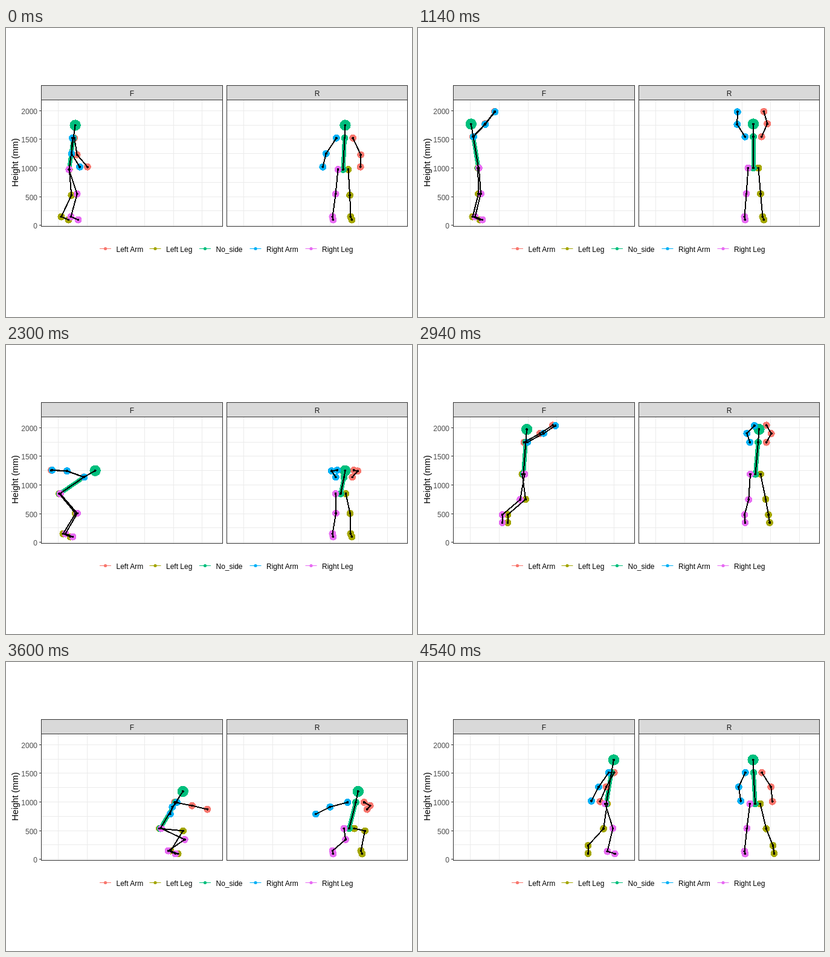
An HTML page for the animation above (4560 ms loop, 672 by 480 pixels).

```html
<!DOCTYPE html>
<html lang="en">
<head>
<meta charset="utf-8">
<title>Jump skeleton</title>
<style>
  html, body { margin: 0; width: 100%; height: 100%; overflow: hidden; background: #fff; }
  svg { display: block; width: 672px; height: 480px; font-family: "Liberation Sans", Arial, sans-serif; font-size: 12px; }
</style>
</head>
<body>
<svg id="stage" viewBox="0 0 672 480"></svg>
<script>
const LOOP = 4560, STEP = 20;
const COLORS = { leftArm: "#F8766D", leftLeg: "#A3A500", mid: "#00BF7D", rightArm: "#00B0F6", rightLeg: "#E76BF3" };
const stage = document.getElementById("stage");

function add(tag, attrs, text, parent = stage) {
  const node = document.createElementNS("http://www.w3.org/2000/svg", tag);
  for (const k in attrs) node.setAttribute(k, attrs[k]);
  if (text) node.textContent = text;
  return parent.appendChild(node);
}
const line = (x1, y1, x2, y2, stroke) => add("line", { x1, y1, x2, y2, stroke });
const pixel = v => Math.round(v) + 0.5;
const heightY = mm => pixel(327.1 - mm * 0.09508);

// ---- chart ----
function drawPanel(x, w, firstGrid, name) {
  for (let mm = 0; mm <= 2000; mm += 250) line(x, heightY(mm), x + w, heightY(mm), "#EBEBEB");
  for (let i = 0; i < 6; i++) {
    const gx = pixel(firstGrid + i * 47.6);
    line(gx, 120, gx, 329, "#EBEBEB");
  }
  add("rect", { x, y: 119.5, width: w, height: 210, fill: "none", stroke: "#333333" });
  add("rect", { x, y: 95.5, width: w, height: 24, fill: "#D9D9D9", stroke: "#333333" });
  add("text", { x: x + w / 2, y: 113, "text-anchor": "middle", fill: "#1A1A1A" }, name);
}
drawPanel(58.5, 300, 86.3, "F");
drawPanel(365.5, 299, 393, "R");
for (let mm = 0; mm <= 2000; mm += 500) {
  const y = heightY(mm);
  line(55, y, 58, y, "#333333");
  add("text", { x: 52, y: y + 5, "text-anchor": "end", fill: "#4D4D4D" }, String(mm));
}
add("text", { transform: "translate(20 223.5) rotate(-90)", "text-anchor": "middle", "font-size": 14.67 }, "Height (mm)");
[["Left Arm", 165, "leftArm"], ["Left Leg", 247.5, "leftLeg"], ["No_side", 330, "mid"],
 ["Right Arm", 413.5, "rightArm"], ["Right Leg", 505.5, "rightLeg"]].forEach(([label, x, part]) => {
  line(x - 10, 366.5, x + 9, 366.5, COLORS[part]);
  add("circle", { cx: x - 0.5, cy: 366.5, r: 2.6, fill: COLORS[part] });
  add("text", { x: x + 17.5, y: 372 }, label);
});

// ---- motion: each track is time, value, time, value ... ----
const tracks = {
  hipX: [0, 104, 1140, 99.5, 1740, 103.5, 2300, 88.5, 2720, 136, 2940, 174, 3240, 222, 3600, 255, 4540, 311],
  hipY: [0, 234.5, 1140, 232, 1740, 232.5, 2300, 246.5, 2720, 240, 2940, 214, 3240, 253, 3600, 276, 4250, 237, 4540, 235],
  lean: [0, 7.7, 1140, -9.3, 1740, -6.8, 2300, 55.5, 2720, 36, 2940, 4.2, 3240, 24, 3600, 30.5, 4250, 10, 4540, 9.5],
  sideHip: [0, 557.5, 1140, 554.5, 2300, 553.5, 2940, 558, 3600, 567.5, 4540, 557.5],
  sideLean: [0, 2.5, 1140, 0, 2300, 5.5, 2940, 4.5, 3600, 11, 4540, -2.5],
  swing: [0, 3, 560, 12, 1140, 137, 1740, 137, 2300, -110, 2620, 5, 2940, 119, 3240, 145, 3600, 17, 4540, -32],
  flex: [0, 33, 1140, 5, 2300, 17, 2940, 4, 3600, 13, 4540, 7],
  twist: [0, 6, 1140, 0, 3240, 0, 3600, 62, 4250, 5, 4540, 3],
  outLeft: [0, 13, 500, 15.5, 1140, 9.5, 2300, 9, 2600, 17, 2940, 8, 3350, 20, 3600, 10, 3900, 17, 4540, 15],
  outRight: [0, 17, 1140, 13, 2300, 7, 2940, 5, 3600, 29, 4540, 11],
  footX: [0, 99, 1140, 92, 1740, 92.3, 2300, 96, 2720, 104, 2940, 143.5, 3240, 266, 3600, 270, 4000, 274, 4540, 297],
  footY: [0, 313, 2500, 313, 2720, 304, 2940, 281.5, 3300, 312.5, 4540, 314],
  stride: [0, -16, 1140, -4, 2300, -4, 2940, 9, 3600, 4, 4000, 0, 4540, -32]
};

// Monotone cubic through a track's points.
function follow(p, t) {
  const last = p.length / 2 - 1;
  const rate = i => (p[2 * i + 3] - p[2 * i + 1]) / (p[2 * i + 2] - p[2 * i]);
  const slope = i => {
    if (i === 0 || i === last) return rate(i && i - 1);
    const a = rate(i - 1), b = rate(i);
    return a * b <= 0 ? 0 : 2 * a * b / (a + b);
  };
  let i = 0;
  while (i < last - 1 && p[2 * i + 2] <= t) i++;
  const h = p[2 * i + 2] - p[2 * i], u = Math.min(1, (t - p[2 * i]) / h), v = 1 - u;
  return p[2 * i + 1] * (1 + 2 * u) * v * v + p[2 * i + 3] * u * u * (3 - 2 * u) +
    h * u * v * (slope(i) * v - slope(i + 1) * u);
}

// ---- body: points are { f: forward, s: sideways, y } ----
const UPPER = 31, FOREARM = 26.5, THIGH = 43, SHANK = 39.5, FOOT = 13, FLOOR = 318;
const rad = deg => deg * Math.PI / 180;
const inPlane = (length, side) => Math.sqrt(Math.max(0, length * length - side * side));

// Bone turned by pitch from hanging straight down, reaching side px sideways.
function bone(from, length, pitch, side) {
  const l = inPlane(length, side), a = rad(pitch);
  return { f: from.f + l * Math.sin(a), s: from.s + side, y: from.y + l * Math.cos(a) };
}

function arm(neck, m, side) {
  const out = side > 0 ? m.outLeft : m.outRight;
  const pitch = m.swing + side * m.twist;
  const shoulder = { f: neck.f - side * (0.18 * m.stride + 1.2), s: neck.s + side * 13.7, y: neck.y };
  const elbow = bone(shoulder, UPPER, pitch, side * out);
  const wrist = bone(elbow, FOREARM, pitch + m.flex - side * m.twist / 4, side * (1.5 * out - 20));
  return [shoulder, elbow, wrist];
}

function leg(pelvis, m, side, t) {
  const hip = { f: pelvis.f - side * (0.09 * m.stride + 1.2), s: pelvis.s + side * 8.5, y: pelvis.y };
  const shift = Math.min(1, Math.max(0, (t - 2400) / 1000));
  const rear = side * m.stride < 0;
  const heel = rear ? Math.max(0, Math.abs(m.stride) - 16) * 0.6 : 0;
  const ankle = {
    f: m.footX + side * m.stride / 2,
    s: side > 0 ? 570 + 17 * shift * shift * (3 - 2 * shift) : 540,
    y: m.footY - heel
  };
  // The knee bends forward between hip and ankle.
  const s = (hip.s + ankle.s) / 2 + m.sideLean * Math.abs(m.sideLean) / 10;
  const a = inPlane(THIGH, s - hip.s), b = inPlane(SHANK, s - ankle.s);
  const df = ankle.f - hip.f, dy = ankle.y - hip.y, d = Math.hypot(df, dy);
  const along = (a * a - b * b + d * d) / (2 * d), bend = inPlane(a, along);
  const knee = { f: hip.f + (df * along + dy * bend) / d, s, y: hip.y + (dy * along - df * bend) / d };
  const drop = Math.min(FOOT, FLOOR - ankle.y);
  const toe = { f: ankle.f + inPlane(FOOT, drop), s: ankle.s + (side > 0 ? 2 : 1), y: ankle.y + drop };
  return [hip, knee, ankle, toe];
}

function pose(t) {
  const m = {};
  for (const name in tracks) m[name] = follow(tracks[name], t);
  const pelvis = { f: m.hipX, s: m.sideHip, y: m.hipY };
  const spine = 53.5 - 6 * Math.abs(Math.sin(rad(m.lean)));
  const rise = (from, length, angle, side) =>
    ({ f: from.f + length * Math.sin(rad(angle)), s: from.s + side, y: from.y - length * Math.cos(rad(angle)) });
  const neck = rise(pelvis, spine, m.lean, m.sideLean);
  const head = rise(neck, 21.5, m.lean * 1.08, m.sideLean * 0.35);
  return {
    leftArm: arm(neck, m, 1), leftLeg: leg(pelvis, m, 1, t), mid: [head, neck, pelvis],
    rightArm: arm(neck, m, -1), rightLeg: leg(pelvis, m, -1, t)
  };
}

// ---- drawing ----
const SIZES = { leftArm: 3, leftLeg: 4, mid: 3, rightArm: 3, rightLeg: 4 };
function makeBody(axis) {
  const group = add("g", { transform: "translate(0.5 0.5)", "shape-rendering": "crispEdges" });
  const dots = [], bones = [];
  const dot = (part, i, r, fill) => dots.push([add("circle", { r, fill }, "", group), part, i]);
  const path = (part, from, stroke, width) =>
    bones.push([add("polyline", { fill: "none", stroke, "stroke-width": width, "stroke-linejoin": "round" }, "", group), part, from]);
  const eachDot = fn => {
    for (const part in SIZES) for (let i = 0; i < SIZES[part]; i++) fn(part, i);
  };
  path("mid", 1, COLORS.mid, 7);
  eachDot((part, i) => dot(part, i, part === "mid" && i === 0 ? 9.2 : 6, COLORS[part]));
  for (const part in SIZES) path(part, 0, "#000", 2);
  eachDot((part, i) => dot(part, i, 2, "#000"));

  return body => {
    for (const [node, part, i] of dots) {
      node.setAttribute("cx", body[part][i][axis]);
      node.setAttribute("cy", body[part][i].y);
    }
    for (const [node, part, from] of bones)
      node.setAttribute("points", body[part].slice(from).map(p => p[axis] + "," + p.y).join(" "));
  };
}
const views = [makeBody("f"), makeBody("s")];

function render(ms) {
  const body = pose(Math.floor((ms % LOOP) / STEP) * STEP);
  for (const draw of views) draw(body);
}
const start = performance.now();
function tick() {
  render(performance.now() - start);
  requestAnimationFrame(tick);
}
tick();
</script>
</body>
</html>
```
